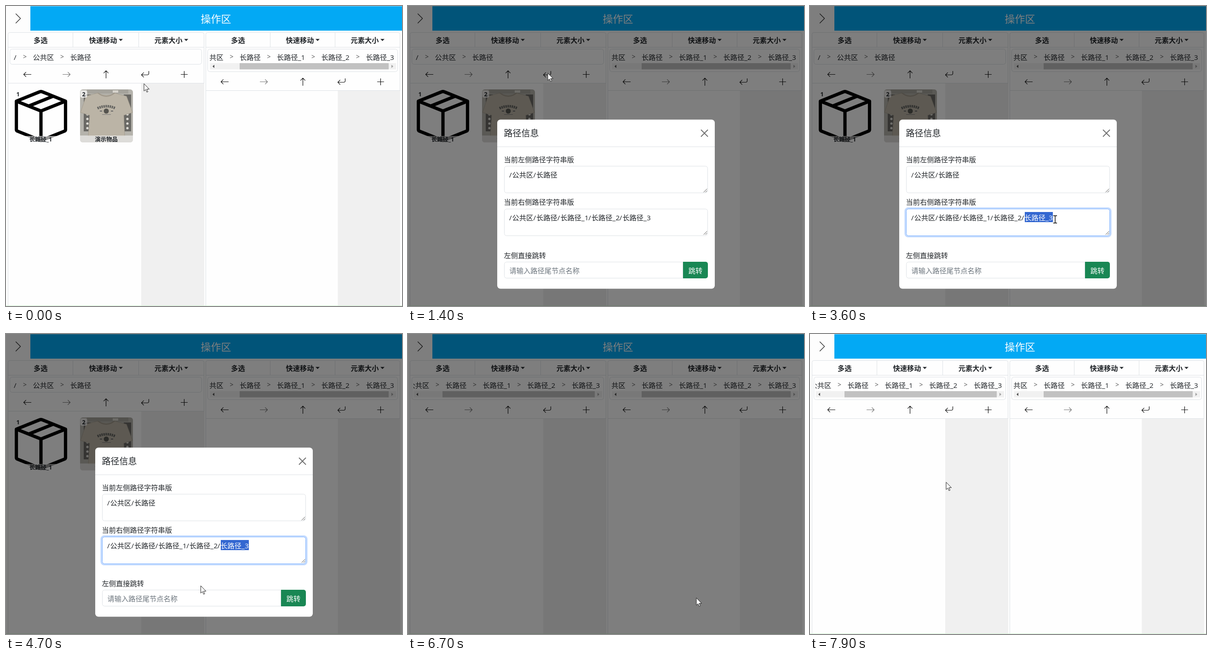
Write an HTML page with a canvas that moves like this. It is 861x651 px and loops after 8000 ms.

```html
<!DOCTYPE html>
<html lang="zh">
<head>
<meta charset="utf-8">
<style>
html, body { margin: 0; width: 861px; height: 651px; overflow: hidden; background: #fff; }
canvas { display: block; }
</style>
</head>
<body>
<canvas id="stage" width="861" height="651"></canvas>
<script>
const g = document.getElementById('stage').getContext('2d');
const LOOP = 8000, INK = '#212529', LINE = '#dee2e6';
const FONT = '"Open Sans", "Noto Sans CJK SC", "Noto Sans CJK", sans-serif';
const JUMP = 6400;          // click on the green button
const HIDE = 6490;          // dialog starts to close

const clamp = v => Math.min(1, Math.max(0, v));
const ramp = (t, start, length) => clamp((t - start) / length);
const smooth = k => k * k * (3 - 2 * k);

// y is the middle of the glyphs
function text(s, x, y, { size = 15.25, color = INK, bold = false, align = 'left' } = {}) {
  g.font = `${bold ? 700 : 400} ${size}px ${FONT}`;
  g.fillStyle = color;
  g.textAlign = align;
  g.fillText(s, x, y + size * 0.38);
}
function rect(x, y, w, h, color) {
  g.fillStyle = color;
  g.fillRect(x, y, w, h);
}
function box(x, y, w, h, r, fill, stroke, width = 1) {
  g.beginPath();
  g.roundRect(x, y, w, h, r);
  if (fill) { g.fillStyle = fill; g.fill(); }
  if (stroke) { g.strokeStyle = stroke; g.lineWidth = width; g.stroke(); }
}
function shape(d, x, y, { fill, stroke, width = 1.2, scale = 1, cap = 'round' }) {
  const p = new Path2D(d);
  g.save();
  g.translate(x, y);
  g.scale(scale, scale);
  g.lineCap = cap;
  g.lineJoin = 'round';
  if (fill) { g.fillStyle = fill; g.fill(p); }
  if (stroke) { g.strokeStyle = stroke; g.lineWidth = width; g.stroke(p); }
  g.restore();
}
function disc(x, y, r, color) {
  g.beginPath();
  g.arc(x, y, r, 0, 7);
  g.fillStyle = color;
  g.fill();
}

const NAV = [
  'M8 0H-8M-3.2-4.8L-8 0L-3.2 4.8',
  'M-8 0H8M3.2-4.8L8 0L3.2 4.8',
  'M0 8V-8M-4.8-3.2L0-8L4.8-3.2',
  'M8-7V-2a3 3 0 0 1-3 3H-8M-3.2-3.8L-8 1L-3.2 5.8',
  'M-7 0H7M0-7V7'
];
const CRATE = 'M8.186 1.113a.5.5 0 0 0-.372 0L1.846 3.5l2.404.961L10.404 2zM11.75 2.539L5.596 5 8 5.961 14.154 3.5z' +
  'M15 4.239l-6.5 2.6v7.922l6.5-2.6zM7.5 14.762V6.838L1 4.239v7.923zM7.443.184a1.5 1.5 0 0 1 1.114 0l7.129 2.852' +
  'A.5.5 0 0 1 16 3.5v8.662a1 1 0 0 1-.629.928l-7.185 2.874a.5.5 0 0 1-.372 0L.63 13.09a1 1 0 0 1-.63-.93V3.5' +
  'a.5.5 0 0 1 .314-.464z';
const CRUMBS = [['公共区', 0], ['长路径', 81], ['长路径_1', 162], ['长路径_2', 258.5], ['长路径_3', 355.5]];

function crumbs(x, clipX, clipW, count) {
  g.save();
  g.beginPath();
  g.rect(clipX, 95, clipW, 30);
  g.clip();
  CRUMBS.slice(0, count).forEach(([name, dx], i) => {
    text(name, x + dx, 111);
    if (i) text('>', x + dx - 17.5, 110, { size: 14, color: '#555', align: 'center' });
  });
  g.restore();
}

function scrollbar(x, w, thumbX, thumbW) {
  rect(x, 124, w, 13.5, '#f1f1f1');
  rect(thumbX, 124, thumbW, 13.5, '#c1c1c1');
  shape('M2-3.5V3.5L-2 0Z', x + 7.5, 131, { fill: '#505050' });
  shape('M-2-3.5V3.5L2 0Z', x + w - 8, 131, { fill: '#a3a3a3' });
}

function panel(x, w, greyX, scrolled) {
  const top = scrolled ? 183 : 167, cell = w / 3;
  box(x + .5, 57.5, w - 1, 620, 4, '#fefefe', LINE);
  rect(greyX, top, x + w - greyX, 484, '#f0f0f0');
  rect(x, 89, w, 1, LINE);
  rect(x, top, w, 1, LINE);
  ['多选', '快速移动', '元素大小'].forEach((label, i) => {
    const mid = x + cell * (i + .5);
    if (i) {
      rect(Math.round(x + cell * i) - 1, 58, 1, 31, LINE);
      text(label, mid - 37, 74, { bold: true });
      shape('M-4.5-2H4.5L0 2.5Z', mid + 32, 73.5, { fill: INK });
    } else text(label, mid, 74, { bold: true, align: 'center' });
  });
  box(x + 4.5, 93.5, w - 10, scrolled ? 49 : 33, 5, '#fefefe', LINE);
  NAV.forEach((d, i) => {
    const mid = Math.floor(x + w * (i + .5) / 5 - .5) + .5;
    shape(d, mid, top - 18.5, { stroke: i == 1 ? '#777' : '#111' });
  });
}

function shirtPhoto() {
  g.save();
  g.beginPath();
  g.roundRect(161, 181, 115, 115, 6);
  g.clip();
  rect(161, 181, 115, 115, '#b5b3ac');
  rect(176, 181, 90, 9, '#a5a39c');
  rect(232, 183, 12, 5, '#d6d3cc');
  for (const x of [169, 256]) {
    rect(x, 192, 16, 80, '#6a6965');
    for (let y = 225; y < 272; y += 10) disc(x + 8, y, 2.6, '#dddbd5');
  }
  shape('M200 189Q218 199 236 189L262 196L275 231L256 237L258 282H179L182 237L162 231L174 196Z', 0, 0,
    { fill: '#bbb4a6', stroke: '#a59e90', width: 1 });
  shape('M200 189Q218 203 236 189', 0, 0, { stroke: '#9f978a', width: 2 });
  g.setLineDash([3, 1.5]);
  shape('M199 222Q218 213 238 222', 0, 0, { stroke: '#62625f', width: 5.5, cap: 'butt' });
  g.setLineDash([]);
  disc(218, 228, 5.5, '#55544f');
  rect(204, 227, 5, 2, '#666');
  rect(228, 227, 5, 2, '#666');
  rect(209, 235, 19, 1, '#777');
  rect(161, 281, 115, 15, 'rgba(255,255,255,.55)');
  g.restore();
  box(161.5, 183, 15, 16, 4, 'rgba(255,255,255,.7)');
  text('2', 169, 191, { size: 12.4, bold: true, align: 'center' });
  text('演示物品', 218, 289, { size: 12.4, bold: true, align: 'center' });
}

function page(t) {
  rect(0, 0, 861, 651, '#fdfdfd');
  rect(53, .5, 808, 53, '#03a9f4');
  shape('M-5-10L5 0L-5 10', 26.5, 27, { stroke: '#333', width: 1.4 });
  text('操作区', 456.5, 28, { size: 22, color: '#fff', align: 'center' });

  const jumped = t >= JUMP;
  panel(4, 427, 294, jumped);
  panel(434, 423, 721.5, true);
  crumbs(427, 442, 407, 5);
  scrollbar(443.5, 404.5, 508, 324);
  if (jumped) {
    crumbs(.5, 12, 410, 5);
    scrollbar(12.5, 409.5, 75, 331);
  } else {
    text('/', 17, 111);
    text('>', 41, 110, { size: 14, color: '#555', align: 'center' });
    crumbs(58.5, 12, 410, 2);
    shape(CRATE, 19, 181.5, { fill: '#000', scale: 7.125 });
    rect(19, 282, 114, 14, 'rgba(255,255,255,.6)');
    text('1', 26, 191, { size: 12.4, bold: true, align: 'center' });
    text('长路径_1', 75.5, 289, { size: 12.4, bold: true, align: 'center' });
    shirtPhoto();
  }
  if (t > 300 && t < 1200) box(258.5, 131.5, 88, 36, 4, null, 'rgba(0,0,0,.06)');
  rect(0, 650, 861, 1, '#d2f5d2');
}

function field(y, w, h, focus, radius = 5) {
  if (focus) box(207.5, y - 1, w + 3, h + 3, 6, null, `rgba(13,110,253,${.25 * focus})`, 4);
  box(209.5, y + .5, w - 1, h, radius, '#fff', focus ? '#86b7fe' : LINE);
}
function grip(y) {
  shape('M0 0L-7 7M0 4L-3 7', 650, y, { stroke: '#555', width: 1 });
}
function pathText(names, y) {
  let x = 220;
  for (const name of names) {
    text('/', x, y);
    text(name, x + 6.5, y);
    x += name.length > 3 ? 67.5 : 52.4;
  }
}

function dialog(t) {
  const closing = t >= HIDE, start = closing ? HIDE : 1100;
  const fade = ramp(t, start, 150), slide = 1 - (1 - ramp(t, start, 300)) ** 2;
  const shown = closing ? 1 - fade : fade;
  if (!shown) return;
  const areaFocus = ramp(t, 2560, 100) * (1 - ramp(t, 4980, 60));
  const inputFocus = ramp(t, 5000, 150) * (t < 6300);
  const pasted = t >= 5400;

  g.save();
  g.globalAlpha = shown;
  g.translate(0, -50 * (closing ? slide : 1 - slide));
  box(194, 246.5, 473, 367, 7, '#fff');
  text('路径信息', 208.5, 276, { size: 19 });
  shape('M-7-7L7 7M7-7L-7 7', 644.5, 276, { stroke: '#6c6c6c', width: 1.8 });
  rect(194, 305, 473, 1, LINE);

  text('当前左侧路径字符串版', 208.5, 333);
  field(347, 443, 58, 0);
  pathText(['公共区', '长路径'], 366);
  grip(397);

  text('当前右侧路径字符串版', 208.5, 425.5);
  field(440, 443, 58, areaFocus);
  const names = CRUMBS.map(c => c[0]);
  pathText(names, 459);
  grip(489);
  if (areaFocus) {
    const end = 467 + 61 * smooth(ramp(t, 2600, 750));
    g.save();
    g.beginPath();
    g.rect(467, 447, end - 467, 22);
    g.clip();
    rect(467, 447, 61, 22, '#3367d1');
    text(names[4], 466.3, 459, { color: '#fff' });
    g.restore();
  }

  text('左侧直接跳转', 208.5, 541);
  field(555, 389, 35, inputFocus, [5, 0, 0, 5]);
  if (pasted) text('长路径_3', 220.5, 574);
  else text('请输入路径尾节点名称', 220.5, 574, { color: '#6c757d' });
  const blink = (t - (pasted ? 5400 : 5000)) % 1000 < 500;
  if (inputFocus && blink) rect(pasted ? 282 : 220, 565, 1, 18, '#000');
  const hover = t > 6130 && t < 6600;
  box(598, 555, 54, 36, [0, 5, 5, 0], hover ? '#157347' : '#198754');
  text('跳转', 625, 574, { color: '#fff', align: 'center' });
  g.restore();
}

// start, end, then the place reached at the end
const MOVES = [[60, 500, 304, 146], [1650, 2500, 467, 460], [2600, 3400, 533, 463],
  [4150, 5000, 380, 580], [5650, 6200, 627, 573], [7130, 7900, 296, 322]];

function cursor(t) {
  let x = 300, y = 169;
  for (const [a, b, toX, toY] of MOVES) {
    const k = smooth(ramp(t, a, b - a));
    x += (toX - x) * k;
    y += (toY - y) * k;
  }
  const open = t > 1200 && t < HIDE + 150;
  const over = (x0, x1, y0, y1) => open && x > x0 && x < x1 && y > y0 && y < y1;
  if (over(209, 652, 348, 406) || over(209, 652, 440, 498) || over(209, 598, 555, 591))
    shape('M-3.5-8H-1L0-7L1-8H3.5M0-7V7M-3.5 8H-1L0 7L1 8H3.5', x, y, { stroke: '#000', width: 1.4 });
  else if (over(598, 652, 555, 591))
    shape('M-1.5 1.5a1.5 1.5 0 0 1 3 0V6.5L9 8.5Q11 9 10.5 12L9 18H0L-5 11.5Q-5 9-1.5 11.5Z', x, y,
      { fill: '#fff', stroke: '#000', width: 1 });
  else
    shape('M0 0V15.5L3.6 12.3L6.2 18L8.6 17L6 11.4H11Z', x, y, { fill: '#fff', stroke: '#222', width: 1 });
}

function draw(now) {
  const t = now % LOOP;
  g.clearRect(0, 0, 861, 651);
  page(t);
  const shade = .5 * ramp(t, 980, 150) * (1 - ramp(t, 6793, 150));
  if (shade) rect(0, 0, 861, 651, `rgba(0,0,0,${shade})`);
  dialog(t);
  cursor(t);
  requestAnimationFrame(draw);
}
requestAnimationFrame(draw);
</script>
</body>
</html>
```
